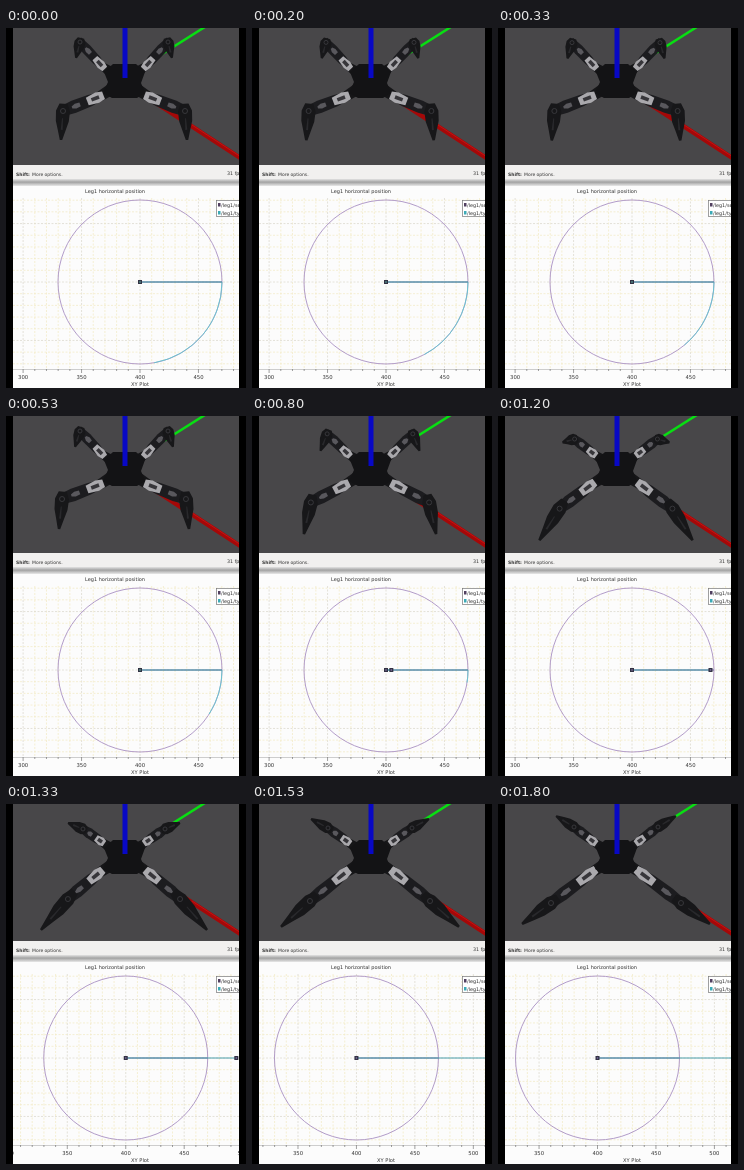
Animation of 240x360 px, one loop 1.87 s. Source, as an HTML page with a canvas:

```html
<!DOCTYPE html>
<html>
<head>
<meta charset="utf-8">
<style>
html, body { margin: 0; width: 240px; height: 360px; overflow: hidden; background: #000; }
canvas { display: block; }
</style>
</head>
<body>
<canvas id="stage" width="240" height="360"></canvas>
<script>
const ctx = document.getElementById('stage').getContext('2d');
const LOOP = 1870, STEP = 200 / 3;
const MID = 118, UNIT = 1.169, PLOT_Y = 254, RADIUS = 82;
const FONT = '"DejaVu Sans", sans-serif';

// Pose keys: time, then the knee and foot of a left leg.
const FRONT = [[0, 57, 83, 55, 112], [530, 56, 83, 53, 113], [1000, 61, 89, 51, 122],
  [1330, 62, 95, 35, 126], [1530, 58, 97, 29, 123], [1800, 53, 99, 24, 120]];
const REAR = [[0, 74, 14, 70, 30], [530, 74, 15, 69, 31], [1000, 76, 20, 68, 38],
  [1330, 77, 25, 62, 19], [1530, 76, 24, 59, 15], [1800, 76, 23, 58, 12]];
const MARKER = [[0, 0], [700, 0], [850, 8], [1000, 30], [1330, 110], [1530, 145], [1800, 150]];
const SHIFT = [[0, 0], [1200, 0], [1330, 14], [1530, 29.5], [1800, 34.5]];

function at(keys, t) {
  const i = keys.findIndex(k => k[0] > t);
  if (i < 0) return keys[keys.length - 1].slice(1);
  const a = keys[i - 1], b = keys[i], p = (t - a[0]) / (b[0] - a[0]);
  return a.slice(1).map((v, j) => v + (b[j + 1] - v) * p);
}

function line(x1, y1, x2, y2, color, width = 1) {
  ctx.strokeStyle = color;
  ctx.lineWidth = width;
  ctx.beginPath();
  ctx.moveTo(x1, y1);
  ctx.lineTo(x2, y2);
  ctx.stroke();
}

function rect(x, y, w, h, color) {
  ctx.fillStyle = color;
  ctx.fillRect(x, y, w, h);
}

function poly(points, color) {
  ctx.fillStyle = color;
  ctx.beginPath();
  points.forEach(p => ctx.lineTo(...p));
  ctx.fill();
}

function text(s, x, y, size, align = 'left', weight = '') {
  ctx.font = `${weight} ${size}px ${FONT}`;
  ctx.textAlign = align;
  ctx.fillStyle = '#333';
  ctx.fillText(s, x, y);
}

function arc(x, y, r, end, color, width = 1) {
  ctx.strokeStyle = color;
  ctx.lineWidth = width;
  ctx.beginPath();
  ctx.arc(x, y, r, 0, end);
  ctx.stroke();
}

// Tapered limb, given as [position along, half width] pairs.
function limb(x1, y1, x2, y2, profile, color) {
  const dx = x2 - x1, dy = y2 - y1, len = Math.hypot(dx, dy) || 1;
  const side = s => ([p, w]) => [x1 + dx * p - dy / len * w * s, y1 + dy * p + dx / len * w * s];
  poly([...profile.map(side(1)), ...profile.map(side(-1)).reverse()], color);
}

function leg(hx, hy, [kx, ky, fx, fy], size) {
  const mx = (hx + kx) / 2, my = (hy + ky) / 2;
  limb(MID, 53, hx, hy, [[0.4, 6], [1, 5 * size]], '#161618');
  limb(hx, hy, kx, ky, [[-0.1, 4], [0.25, 6], [0.7, 6.5], [1.08, 5]].map(([p, w]) => [p, w * size]), '#1c1c1f');
  limb(kx, ky, fx, fy, [[-0.25, 4], [0, 7], [0.35, 6.5], [0.65, 4], [1, 1.2]].map(([p, w]) => [p, w * size]), '#171719');
  limb(hx, hy, mx, my, [[-0.25, 4], [0.1, 5.5], [0.65, 4]].map(([p, w]) => [p, w * size]), '#aaa9ad');
  limb(hx, hy, mx, my, [[0, 1.8], [0.42, 1.8]], '#37363a');
  limb(mx, my, kx, ky, [[0.05, 2], [0.3, 2.5], [0.5, 1]], '#59585d');
  arc(kx, ky, 2.5 * size, 7, '#37373b');
  limb(kx, ky, fx, fy, [[0.25, 0.5], [0.65, 1]], '#29292c');
}

function robot(t) {
  rect(7, 0, 226, 137, '#484749');
  line(MID, 50, 202, -3, '#08df12', 2.5);
  line(MID, 54, 242, 135, '#a50808', 4.5);
  line(186, 97, 242, 133.5, '#c51212', 1);
  for (const mirror of [false, true]) {
    ctx.save();
    if (mirror) {
      ctx.translate(2 * MID, 0);
      ctx.scale(-1, 1);
    }
    leg(96, 38, at(REAR, t), 0.8);
    leg(93, 69, at(FRONT, t), 1);
    ctx.restore();
  }
  poly([[107, 36], [130, 36], [139, 44], [135, 55], [139, 65], [131, 70],
    [106, 70], [97, 65], [102, 54], [98, 44]], '#131315');
  rect(116.5, 0, 5, 50, '#0808c5');
}

function chrome() {
  rect(7, 137, 226, 15, '#f1f0ef');
  text('Shift:', 10, 147.5, 4.5, 'left', 'bold');
  text('More options.', 26, 147.5, 4.5);
  text('31 fps', 221, 147, 4.8);
  const band = ctx.createLinearGradient(0, 151, 0, 158);
  band.addColorStop(0, '#e2e2e2');
  band.addColorStop(0.45, '#a2a2a2');
  band.addColorStop(1, '#e8e8e8');
  rect(7, 151, 226, 7, band);
  rect(7, 158, 226, 202, '#fcfcfc');
  text('Leg1 horizontal position', 109, 165, 5, 'center');
  text('XY Plot', 134, 358, 5.1, 'center');
}

function plot(t) {
  const cx = 134 - at(SHIFT, t)[0];
  const marker = at(MARKER, t)[0];
  const trace = Math.max(0, 80 - t * 0.089) * Math.PI / 180;

  ctx.setLineDash([2, 1.5]);
  for (let n = -12; n <= 12; n++) {
    const x = cx + n * 10 * UNIT, y = PLOT_Y + n * 10 * UNIT;
    line(x, 170, x, 341, n % 5 ? '#f3ebc8' : '#dedbd0', 0.8);
    if (y > 169 && y < 342) line(7, y, 233, y, n % 5 ? '#f3ebc8' : '#dedbd0', 0.8);
  }
  ctx.setLineDash([]);
  line(7, 341.5, 233, 341.5, '#b9b9b9', 0.7);
  for (let n = -12; n <= 12; n++) {
    const x = cx + n * 10 * UNIT;
    line(x, 341, x, n % 5 ? 343 : 345, '#777', 0.7);
    if (n % 5 === 0) text(400 + n * 10, x, 351, 5.3, 'center');
  }

  arc(cx, PLOT_Y, RADIUS, 7, '#aa91c3', 0.9);
  line(cx, PLOT_Y, cx + RADIUS, PLOT_Y, '#60589a', 0.9);
  if (trace) {
    arc(cx, PLOT_Y, RADIUS, trace, '#62c6d0', 0.9);
    line(cx, PLOT_Y, cx + RADIUS, PLOT_Y, '#4b9eaa', 1);
  }
  line(cx, PLOT_Y, cx + marker, PLOT_Y, '#4b9eaa', 1);
  for (const x of [cx, cx + marker]) {
    rect(x - 2, PLOT_Y - 2, 4, 4, '#333344');
    rect(x - 0.7, PLOT_Y - 0.7, 1.4, 1.4, x === cx && !marker ? '#58aaa0' : '#8370aa');
  }

  rect(210, 172, 30, 17, '#fff');
  ctx.strokeStyle = '#777';
  ctx.lineWidth = 0.7;
  ctx.strokeRect(210.5, 172.5, 30, 16);
  rect(212, 175, 2.5, 3.5, '#514060');
  rect(212, 183, 2.5, 3.5, '#3caab6');
  text('/leg1/set', 215, 178.5, 4.9);
  text('/leg1/typ', 215, 186.5, 4.9);
}

function draw(now) {
  const t = Math.floor((now % LOOP + 5) / STEP) % 28 * STEP;
  rect(0, 0, 240, 360, '#000');
  ctx.save();
  ctx.beginPath();
  ctx.rect(7, 0, 226, 360);
  ctx.clip();
  robot(t);
  chrome();
  plot(t);
  ctx.restore();
  requestAnimationFrame(() => draw(performance.now() - start));
}

const start = performance.now();
draw(0);
</script>
</body>
</html>
```
